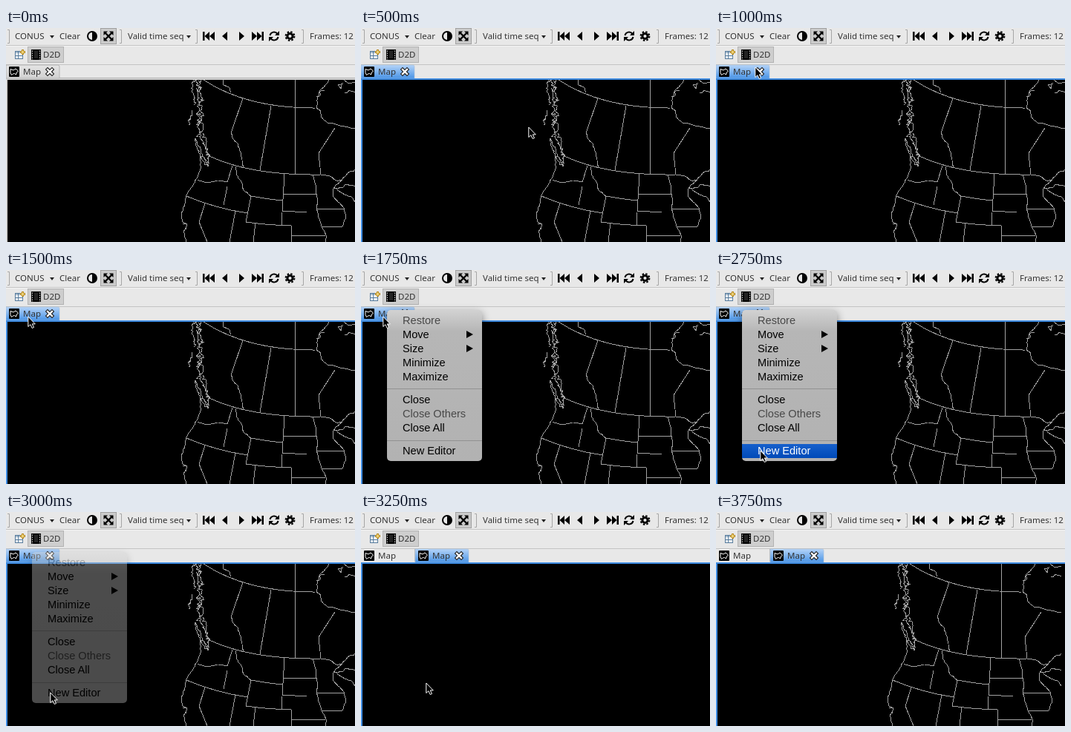
Animation, 470 px wide and 289 px high, one loop 4500 ms. Source, as an HTML page:

```html
<!DOCTYPE html>
<html lang="en">
<head>
<meta charset="utf-8">
<title>New map editor</title>
<style>
html, body { margin: 0; width: 100%; height: 100%; overflow: hidden; background: #e8e8e8; }
svg { display: block; width: 470px; height: 289px; }
text { font: 11.5px "Noto Sans", sans-serif; fill: #333; }
.tab text { font: 11px "Liberation Sans", Arial, sans-serif; fill: #000; }
#idle text { fill: #777; }
#menu text { font: 14.6px "Liberation Sans", Arial, sans-serif; fill: #000; }
#menu .off { fill: #484848; }
#menu .lit text { fill: #fff; }
.line { fill: none; stroke: #a2a2a2; shape-rendering: crispEdges; }
#idle, #focus, #fresh, #map, #menu, .lit, #cursor { animation: 4.5s step-end infinite; }
#idle { animation-name: idle; }
#focus { animation-name: focus; }
#fresh { animation-name: fresh; }
#map { animation-name: map; }
#menu { animation-name: menu; }
#lit1 { animation-name: lit1; }
#lit2 { animation-name: lit2; }
#cursor { animation-name: cursor; }
@keyframes idle { 0% { opacity: 1 } 11.11%, 100% { opacity: 0 } }
@keyframes focus { 0% { opacity: 0 } 11.11% { opacity: 1 } 72.22%, 100% { opacity: 0 } }
@keyframes fresh { 0% { opacity: 0 } 72.22%, 100% { opacity: 1 } }
@keyframes map {
  0% { opacity: 1; transform: none }
  72.22% { opacity: 0; transform: none }
  77.77%, 100% { opacity: 1; transform: translate(-5px, 0) }
}
@keyframes menu { 0% { opacity: 0 } 38.88% { opacity: 1 } 66.66% { opacity: .42 } 72.22%, 100% { opacity: 0 } }
@keyframes lit1 { 0% { opacity: 0 } 50% { opacity: 1 } 55.55%, 100% { opacity: 0 } }
@keyframes lit2 { 0% { opacity: 0 } 61.11% { opacity: 1 } 66.66%, 100% { opacity: 0 } }
@keyframes cursor {
  0% { opacity: 0; transform: translate(272px, 116px) }
  5.55% { opacity: 1; transform: translate(272px, 116px) }
  11.11% { opacity: 1; transform: translate(225px, 133px) }
  16.66% { opacity: 1; transform: translate(157px, 110px) }
  22.22% { opacity: 1; transform: translate(52px, 52px) }
  27.77% { opacity: 1; transform: translate(30px, 61px) }
  33.33% { opacity: 1; transform: translate(29px, 62px) }
  50% { opacity: 1; transform: translate(58px, 221px) }
  55.55% { opacity: 1; transform: translate(59px, 240px) }
  61.11% { opacity: 1; transform: translate(59px, 243px) }
  72.22% { opacity: 1; transform: translate(87px, 230px) }
  77.77% { opacity: 1; transform: translate(440px, 140px) }
  83.33%, 100% { opacity: 0; transform: translate(440px, 140px) }
}
</style>
</head>
<body>
<svg viewBox="0 0 470 289">
  <defs>
    <linearGradient id="blue" x2="0" y2="1">
      <stop offset="0" stop-color="#b4d3f8"/><stop offset="1" stop-color="#4a94e6"/>
    </linearGradient>
    <linearGradient id="gray" x2="0" y2="1">
      <stop offset="0" stop-color="#e4e4e4"/><stop offset="1" stop-color="#d2d2d2"/>
    </linearGradient>
    <linearGradient id="sheet" x2="0" y2="1">
      <stop offset="0" stop-color="#d2d2d2"/><stop offset=".14" stop-color="#b6b6b6"/><stop offset="1" stop-color="#b2b2b2"/>
    </linearGradient>
    <linearGradient id="pick" x2="0" y2="1">
      <stop offset="0" stop-color="#1660cc"/><stop offset="1" stop-color="#004ab8"/>
    </linearGradient>
    <clipPath id="view"><path d="M2 70H470V289H2z"/></clipPath>
    <g id="label">
      <rect x="4" y="52" width="14" height="14" rx="1"/>
      <path d="M6 55.5l4 1.500 3-2 3.500 3-2 2-1 3-2-1.500-2 .5-2 1.500-1.500-3z" fill="none" stroke="#fff"/>
      <text x="23" y="63">Map</text>
    </g>
    <g id="close" fill="none">
      <path d="M56 56l6 6m0-6l-6 6" stroke="#222" stroke-width="4.6" stroke-linecap="square"/>
      <path d="M56 56l6 6m0-6l-6 6" stroke="#fff" stroke-width="2.4" stroke-linecap="square"/>
    </g>
    <path id="shape" d="M0 68V50H70Q72 50 72 52V68z"/>
    <path id="grip" d="M0 2.500H2.500V20.500H0" fill="none" stroke="#a6a6a6"/>
    <path id="drop" d="M0 0h6l-3 4z" fill="#222"/>
  </defs>

  <rect width="470" height="289" fill="#e8e8e8"/>
  <path d="M0 23.5H470M0 49.5H470" stroke="#c4c4c4"/>
  <path d="M0 24.5H470" stroke="#f4f4f4"/>

  <!-- toolbar -->
  <use href="#grip" x="2"/><use href="#grip" x="153"/><use href="#grip" x="255"/><use href="#grip" x="398"/>
  <text x="12" y="15">CONUS</text><use href="#drop" x="59" y="10"/>
  <text x="72" y="15">Clear</text>
  <text x="164" y="15">Valid time seq</text><use href="#drop" x="243" y="10"/>
  <text x="409" y="15">Frames: 12</text>
  <circle cx="116" cy="11" r="6" fill="none" stroke="#000" stroke-width="2"/>
  <path d="M116 5a6 6 0 0 1 0 12z"/>
  <rect x="127.5" y=".5" width="21" height="21" fill="#cacaca" stroke="#a2a2a2"/>
  <path d="M133.500 6.500l9 9m0-9l-9 9" stroke="#000" stroke-width="2.400"/>
  <path d="M131.500 4.500h5.500l-5.500 5.500zM144.500 4.500H139l5.500 5.500zM131.500 17.500h5.500l-5.500-5.500zM144.500 17.500H139l5.500-5.500z"/>
  <path d="M265 5h2.500v12H265zM274 5v12l-6.500-6zM281 5v12l-7-6zM298 5v12l-7-6zM314 5v12l7-6zM331 5v12l7-6zM338 5v12l6.500-6zM344.500 5h2.500v12h-2.500z"/>
  <g fill="none" stroke="#000" stroke-width="2">
    <path d="M355.500 10a5.500 5.500 0 0 1 10-2M366.500 12a5.500 5.500 0 0 1-10 2"/>
    <circle cx="382.500" cy="11" r="3.600" stroke-width="3"/>
    <circle cx="382.500" cy="11" r="5.900" stroke-dasharray="2.500 2.134"/>
  </g>
  <path d="M368 4v6h-6zM354 18v-6h6z"/>

  <!-- perspective bar -->
  <rect x="12.500" y="31.500" width="10" height="10" fill="#fff" stroke="#557a9c"/>
  <path d="M12 33h11M16.500 32v10M12 37.500h11" stroke="#557a9c"/>
  <path d="M22.500 29v7M19 32.500h7" stroke="#b58a24" stroke-width="3"/>
  <path d="M22.500 30v5M20 32.500h5" stroke="#ffe58c"/>
  <rect x="29.500" y="25.500" width="48" height="21" fill="#cecece" stroke="#b2b2b2"/>
  <rect x="34" y="29" width="13" height="14"/>
  <path d="M35.500 30.500V43M45.500 30.500V43" stroke="#ddd" stroke-dasharray="1.500 1.500"/>
  <rect x="38" y="31" width="5" height="10" fill="#222"/>
  <text x="50" y="40">D2D</text>

  <!-- map -->
  <rect y="68" width="470" height="221" fill="#d4d4d4"/>
  <rect x="2" y="70" width="468" height="219"/>
  <g clip-path="url(#view)">
    <g id="map" class="line">
      <path d="M266 70Q325 109 418 108M274 173Q330 199.500 424 198M389.500 70V197M357 105L342 192M319 95L303 142M443 135L421 169 424 198"/>
      <path d="M243 227Q280 243 325 250M305 186L298 208M298 214L293 239M331 227Q350 231 373 233M330 227L323 262Q350 266 384 267M375 197L371 266M374 224.500H418M372 247L405 249M384 267V289M384 280H430"/>
      <path d="M268 237L260 262 271 289M309 247L301 289M336 263L333 289M418 244H455M425 268H453"/>
      <g id="coast"></g>
    </g>
  </g>

  <!-- tab states -->
  <g id="idle" class="tab">
    <use href="#shape" fill="url(#gray)" stroke="#b4b4b4"/>
    <path d="M72 67.500H470" stroke="#b4b4b4"/>
    <use href="#label"/><use href="#close"/>
  </g>
  <g id="focus" class="tab">
    <use href="#shape" fill="url(#blue)" stroke="#a9bfd8" stroke-width=".6"/>
    <path d="M0 68H470V70H2V289H0z" fill="#3f8ce2"/>
    <use href="#label"/><use href="#close"/>
  </g>
  <g id="fresh" class="tab">
    <path d="M72.500 50V67" stroke="#bbb"/>
    <use href="#shape" x="73" fill="url(#blue)" stroke="#a9bfd8" stroke-width=".6"/>
    <path d="M0 68H470V70H2V289H0z" fill="#3f8ce2"/>
    <use href="#label"/><use href="#label" x="73"/><use href="#close" x="73"/>
  </g>

  <!-- context menu -->
  <g id="menu">
    <rect x="35" y="54" width="128" height="204" rx="5" fill="url(#sheet)" style="filter:drop-shadow(0 4px 6px rgba(0,0,0,.45))"/>
    <path d="M35 160.500H163M35 230.500H163" stroke="#929292"/>
    <text class="off" x="56" y="73">Restore</text>
    <text x="56" y="92">Move</text>
    <text x="56" y="111">Size</text>
    <text x="56" y="130">Minimize</text>
    <text x="56" y="149">Maximize</text>
    <text x="56" y="180">Close</text>
    <text class="off" x="56" y="199">Close Others</text>
    <text x="56" y="218">Close All</text>
    <text x="56" y="249">New Editor</text>
    <path d="M142 82v10l9-5zM142 101v10l9-5z"/>
    <g id="lit1" class="lit">
      <rect x="35" y="204" width="128" height="19" fill="url(#pick)"/><text x="56" y="218">Close All</text>
    </g>
    <g id="lit2" class="lit">
      <rect x="35" y="235" width="128" height="19" fill="url(#pick)"/><text x="56" y="249">New Editor</text>
    </g>
  </g>

  <g id="cursor">
    <path d="M.8 1V14.500L3.900 11.700 6.200 16.500 8.500 15.500 6.300 10.900H10.300z" stroke="#fff"/>
  </g>
</svg>
<script>
let seed = 7;
const rand = () => (seed = seed * 16807 % 2147483647) / 2147483647 - .5;
const coast = document.getElementById('coast');

// Walk along a polyline, shaking each step sideways.
function rough(text, shake = 2, step = 3) {
  const pts = text.split(' ').map(p => p.split(',').map(Number));
  let d = 'M' + pts[0];
  for (let i = 1; i < pts.length; i++) {
    const [ax, ay] = pts[i - 1], [bx, by] = pts[i];
    const n = Math.max(1, Math.round(Math.hypot(bx - ax, by - ay) / step));
    for (let k = 1; k <= n; k++) {
      const s = k < n ? shake : 0;
      d += `L${(ax + (bx - ax) * k / n + rand() * s).toFixed(1)} ${(ay + (by - ay) * k / n + rand() * s).toFixed(1)}`;
    }
  }
  const path = document.createElementNS('http://www.w3.org/2000/svg', 'path');
  path.setAttribute('d', d);
  coast.append(path);
}

// Pacific shore and western borders
rough('262,173 262,190 257,203 249,216 243,226 241,237 236,252 238,262 244,266 239,275 243,289', 1.500);
rough('258,205 268,209 283,206 298,208', 1.500);
rough('303,142 305,148 312,156 316,168 318,178 320,188', 1.500);
rough('309,187 310,198 317,208 320,219 326,224 331,228', 1.500);
rough('292,70 293,77 300,80 303,87', 1.500);
rough('238,264 244,265 242,272', 1);
// Northern bay
rough('435,70 431,76 425,82 420,92 418,108 424,112 425,121 433,128 444,130 456,133 470,136', 1.500);
rough('418,93 424,90 422,86 429,84', 2);
rough('447,77 453,75 451,82 447,77', 1.500);
rough('455,70 461,75 470,74');
rough('456,88 463,84 470,87');
// Midwest and lakes
rough('413,198 417,212 418,224 420,235 418,244 421,256 425,268 431,280 431,289', 1);
rough('424,198 436,200 445,206 453,206', 1.500);
rough('470,191 460,196 452,206 441,217 452,216 460,211 470,214', 2.500);
rough('441,218 440,227 447,235 455,243 458,254 453,268', 1.500);
rough('446,219 456,225 465,228 470,235', 1.500);

// Inlets and islands of the north-west shore
for (const x of [252, 257, 262]) rough(`${x},70 ${x + 1},104`, 6, 1.800);
for (const x of [259, 263]) rough(`${x},104 ${x},146`, 6, 2);
rough('262,146 268,160 273,172 270,182', 6, 2);
rough('265,142 270,158 274,172 271,184', 4);
rough('255,149 261,162 266,174 272,187 266,180 259,168 255,149', 3, 2);
rough('250,111 249,122 246,131', 4, 1.500);
</script>
</body>
</html>
```
